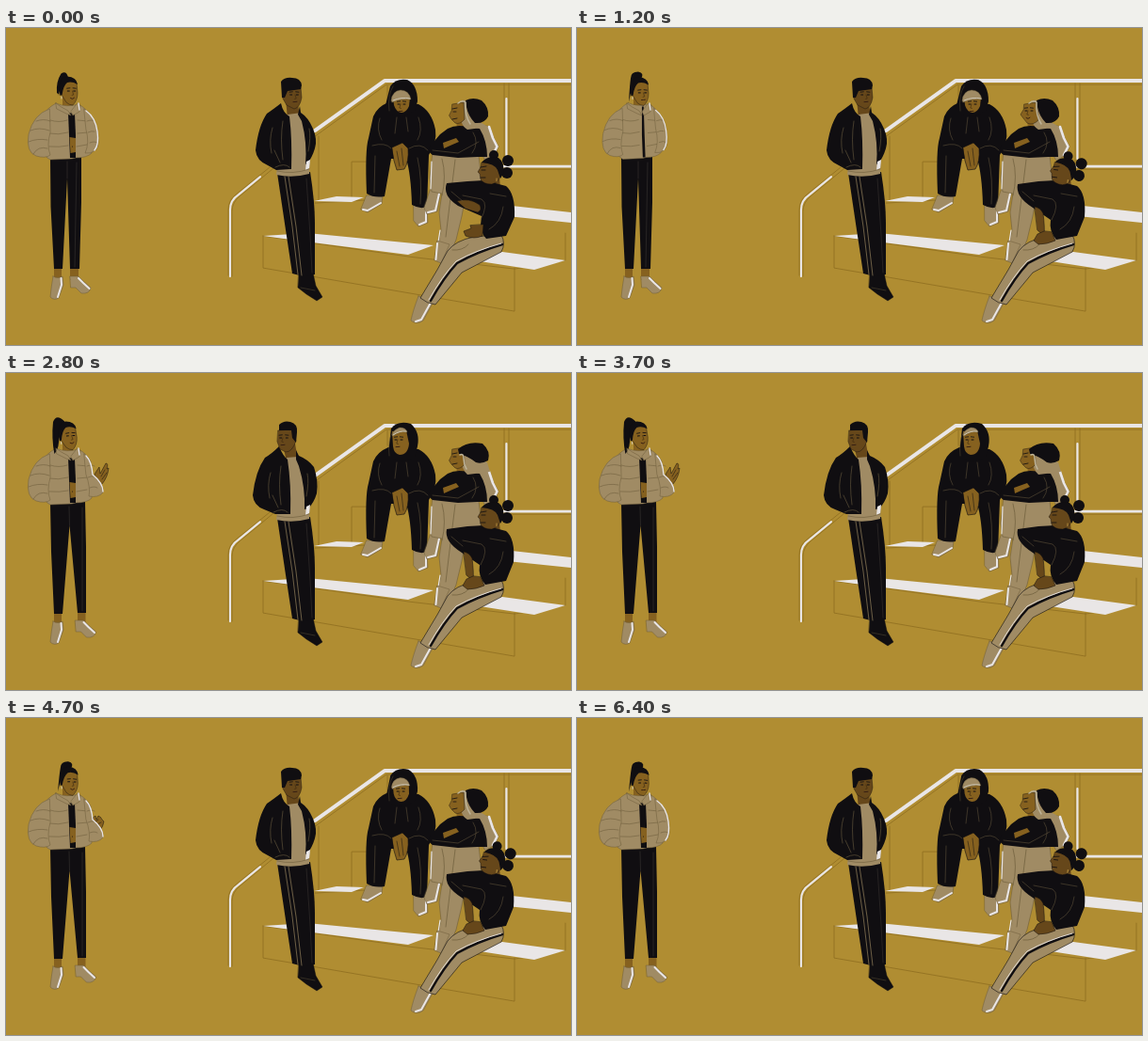
Animation of 600x337 px, one loop 6.5 s. Source, as an HTML page with a canvas:

```html
<!DOCTYPE html>
<html lang="en">
<head>
<meta charset="utf-8">
<title>Friends on the steps</title>
<style>
html, body { margin: 0; width: 100%; height: 100%; overflow: hidden; background: #b08d32; }
canvas { display: block; width: 100vw; height: 100vh; }
</style>
</head>
<body>
<canvas id="stage"></canvas>
<script>
const W = 600, H = 337, LOOP = 6500, STEP = 100;
const GOLD = '#b08d32', INK = '#100e11', CLOTH = '#a08b64', WHITE = '#e9e6e6';
const TAN = '#86611f', BROWN = '#66471a', EDGE = '#8f6e20', SEAM = '#6a5d40', FOLD = '#6d5d3b';

const canvas = document.getElementById('stage');
const ctx = canvas.getContext('2d');
const ratio = Math.max(1, window.devicePixelRatio || 1);
canvas.width = Math.round(W * ratio);
canvas.height = Math.round(H * ratio);
ctx.lineCap = ctx.lineJoin = 'round';

const NUM = /-?\d+(\.\d+)?/g;

// Blend two paths that share the same commands.
function mix(a, b, k) {
  const ends = b.match(NUM);
  let i = 0;
  return a.replace(NUM, v => (+v + (ends[i++] - v) * k).toFixed(2));
}

function fill(path, color) {
  ctx.fillStyle = color;
  ctx.fill(new Path2D(path));
}

function line(path, color, width = 0.7) {
  ctx.strokeStyle = color;
  ctx.lineWidth = width;
  ctx.stroke(new Path2D(path));
}

function shape(path, color, edge = INK, width = 0.7) {
  fill(path, color);
  line(path, edge, width);
}

function shoe(path, shine) {
  shape(path, CLOTH, FOLD, 0.5);
  line(shine, WHITE, 2);
}

function dot(x, y, r, color) {
  ctx.fillStyle = color;
  ctx.beginPath();
  ctx.arc(x, y, r, 0, 7);
  ctx.fill();
}

function group(draw, dx = 0, dy = 0, angle = 0, px = 0, py = 0, sx = 1) {
  ctx.save();
  ctx.translate(px + dx, py + dy);
  ctx.rotate(angle);
  ctx.scale(sx, 1);
  ctx.translate(-px, -py);
  draw();
  ctx.restore();
}

// Eased value between [time, value] stops.
function key(t, ...stops) {
  let [t0, v0] = stops[0];
  if (t <= t0) return v0;
  for (const [t1, v1] of stops) {
    if (t < t1) {
      const k = (t - t0) / (t1 - t0);
      return v0 + (v1 - v0) * k * k * (3 - 2 * k);
    }
    [t0, v0] = [t1, v1];
  }
  return v0;
}

// Brows, eyes, nose and mouth; side points the nose left (-1) or right (1).
function features(x, y, side, gap = 4, smile = 0) {
  group(() => {
    line(`M${-gap - 1.6} -2.8 L${-gap + 1.6} -3.2 M${gap - 1.6} -3.2 L${gap + 1.6} -2.8`, INK, 0.8);
    line(`M${-gap - 1} 0 h2 M${gap - 1} 0 h2`, INK, 1);
    line(`M${side} 0 L${side * 2.2} 4 L${side * 0.6} 4.4`, '#3d290f', 0.6);
    line(`M${side - 2} 7.6 Q${side} ${7.6 + smile * 2} ${side + 2} 7.3`, '#321b12', 0.9);
  }, x, y);
}

function scenery() {
  line('M367 181 V143 H386 M332 116 V184 M405 62 V78 M328 187 L381 184 M273 222 V256 L540 302 V256 M273 222 L428 244 L540 257 L594 248 V219 M529 60 V146 M534 60 V146 M528 151 H600', EDGE, 0.8);
  fill('M327 185 L351 180 L380 181 L367 186Z', WHITE);
  fill('M537 190 L600 197 V208 L532 201Z', WHITE);
  fill('M273 222 L320 219 L454 232 L427 242 L310 227Z', WHITE);
  fill('M490 247 L527 239 L594 248 L561 258Z', WHITE);
  line('M600 61 H404 L331 114 L284 150 L249 179 Q240 186 240 196 V265', EDGE, 0.8);
  line('M280 149 L244 178 Q236 184 236 194 V264', EDGE, 0.8);
  line('M600 57 H402 L328 110', WHITE, 4);
  line('M531.4 76 V140', WHITE, 2.2);
  line('M527 148 H600', WHITE, 2.8);
  line('M270 159 L247 178 Q238 184 238 194 V265', WHITE, 2.1);
}

function puffer(t, shy, lift) {
  shape('M53 80 Q64 85 77 81 Q86 86 90 94 L91 133 Q86 138 74 138 L70 139 L47 140 Q42 138 41 133 L37 96 Q42 86 53 80Z', CLOTH, FOLD, 0.5);
  line('M47 98 Q56 101 65 98 M45 112 Q56 114 66 111 M46 126 Q57 127 66 125 M76 98 L87 99 M76 112 L87 111 M75 126 L86 124', FOLD, 0.55);
  fill(mix('M66 90 L73 91 L74 114 L74 138 L68 138 L67 114Z', 'M69 84 L71 84 L72 114 L73 138 L70 138 L69 114Z', shy), INK);
  if (shy < 0.8) {
    fill(mix('M67.5 116 L74 117 L74 132 L68.5 133Z', 'M70 118 L71 118 L71 134 L70 134Z', shy), TAN);
    dot(70.5, 126, 0.5, INK);
  }
  shape('M46 86 Q29 92 24 113 Q21 132 32 136 Q42 139 47 135 Q43 125 47 111Z', CLOTH, FOLD, 0.5);
  line('M32 99 Q40 96 47 99 M26 109 Q35 105 46 109 M24 121 Q33 117 44 119 M29 134 Q34 125 44 128', FOLD, 0.55);

  if (lift > 0.1) {
    const curl = key(t, [4200, 0], [4500, 1]);
    group(() => {
      shape(mix('M95 121 Q92 111 95 106 L99 100 L100 107 L106 96 Q109 96 107 102 L109 101 Q108 111 102 118Z',
        'M92 119 Q90 112 92 106 L95 104 L96 108 L98 104 Q101 105 102 108 L104 110 Q103 116 100 119Z', curl), TAN, INK, 0.5);
      line(mix('M101 110 L105 103 M102 113 L107 106', 'M95 110 L98 108 M97 113 L101 111', curl), INK, 0.5);
    }, -9 * (1 - lift), 20 * (1 - lift));
  }
  const sleeve = mix('M83 86 Q94 93 97 108 Q100 125 95 130 Q90 134 84 133 Q89 122 85 108Z',
    'M83 86 Q91 93 92 108 Q104 117 103 127 Q98 133 88 131 Q90 122 85 108Z', lift);
  shape(sleeve, CLOTH, FOLD, 0.5);
  line('M86 99 Q91 97 94 99 M87 111 Q91 109 94 110 M89 122 Q94 120 97 122', FOLD, 0.55);
  line(mix('M85 88 Q95 95 97 110 Q99 124 94 130', 'M85 88 Q91 94 92 108 Q103 117 103 126', lift), WHITE, 1.4);
}

function presenter(t) {
  const shy = key(t, [500, 0], [1000, 1], [1400, 1], [1800, 0]);
  const stance = key(t, [1350, 0], [1750, 1]);
  const lift = key(t, [1450, 0], [1900, 1], [5100, 1], [5600, 0]);
  const bun = key(t, [0, 0.5], [500, 0.5], [1000, 1], [1450, 1], [1850, 0], [4100, 0], [4500, 1]);
  const nod = key(t, [500, 0], [1000, 1], [1450, 1], [1850, 0], [4100, 0], [4500, 0.4], [5400, 0.4], [6000, 1]);
  const tilt = key(t, [2100, 0], [2500, -0.07], [4100, -0.07], [4500, 0.03]);

  fill('M51 254 H59 V267 H51Z', TAN);
  fill(mix('M68 254 H77 V268 H68Z', 'M76 254 H84.5 V267 H76Z', stance), TAN);
  fill(mix('M47 138 L80 137 L80 185 L78 256 L68 256 L65 160 L60 256 L51 256 L47.5 190Z',
    'M47 138 L84 137 L85 185 L85 255 L76 255 L67.5 162 L60 256 L51 256 L48 190Z', stance), INK);
  line(mix('M65 142 L65 160 M75 143 L73 254', 'M67 142 L67.5 162 M81 143 L81 253', stance), '#403d39', 0.5);
  shoe('M50 264 Q55 267 60 264 L61 273 L56 287 Q51 290 47 286 Q48 275 50 264Z', 'M58.5 266 L59 273 L55 286');
  group(() => shoe('M68 264 L77 264 L83 270 L90 276 Q89 283 80 282 L74 276 L69 276Z', 'M77 266 L82 271 L88.5 277'), stance * 5.5, stance * -1);

  fill('M60 69 L71 76 L71 87 Q65 90 60 84Z', TAN);
  group(() => puffer(t, shy, lift), shy * 0.5, shy * -0.5, 0, 62, 0, 1 - shy * 0.08);
  group(() => {
    fill(mix('M64 51 Q56 42 52 51 Q49 68 51 85 Q57 80 57 66 Q57 58 64 53Z',
      'M68 54 Q72 47 65 46 Q57 46 57 53 Q56 60 55 78 Q57 69 59 60Z', bun), INK);
    shape('M59 60 Q66 53 75 58 L76 69 Q76 77 71 82 Q67 82 64 79 L59 71Z', TAN, INK, 0.4);
    fill('M57.5 72 Q54 53 65 51.5 Q75 52 76 60 Q70 56.5 65 58 Q61 61 59.5 71Z', INK);
    features(69.5, 67 + nod * 1.4, 1, 3.2, nod < 0.5 ? 1 : 0);
    line('M59 73 V75', WHITE, 0.7);
  }, 0, nod * 0.5, tilt, 65, 80);
  shape('M53 80 Q58 84 66 88 L69 93 L64 91 L54 86Z', CLOTH, FOLD, 0.5);
  shape('M76 80 L79 82 L78 89 L71 93 L69 89Z', CLOTH, FOLD, 0.5);
  line('M77 80 L78 87', WHITE, 1.4);
}

function standing(k) {
  shape('M311 261 L326 260 L329 274 L336 286 L330 290 L319 283 L310 276Z', INK, INK, 0.4);
  line('M313 276 L328 279', SEAM, 0.4);
  fill('M288 154 L323 153 Q328 185 328 207 L328 262 Q316 265 304 261 L296 208Z', INK);
  line('M296 158 L304 211 L310 262 M300 158 L308 211 L314 263', CLOTH, 0.65);
  line('M319 160 L323 220 L325 260', '#3e3935', 0.5);

  fill(mix('M297 76 L310 81 L312 93 L299 96Z', 'M294 77 L307 75 L310 93 L298 94Z', k), BROWN);
  fill(mix('M299 92 L314 90 L319 114 L323 140 L322 155 Q304 160 287 156 L288 148 L301 149 L302 116Z',
    'M298 90 L310 89 L317 112 L323 140 L322 155 Q304 160 287 156 L288 148 L301 149 L301 116Z', k), CLOTH);
  fill(mix('M292 80 Q283 87 277 91 Q268 104 265 130 Q266 141 278 146 L287 151 L303 150 Q304 118 301 94 Q294 90 292 80Z',
    'M290 78 Q282 86 275 90 Q265 104 262 130 Q263 141 274 145 L286 150 L302 150 Q303 118 299 92 Q294 88 290 78Z', k), INK);
  fill(mix('M312 83 L313 90 Q321 95 326 107 Q331 119 328 128 Q325 138 320 144 L318 145 Q320 122 314 99 L310 92Z',
    'M308 82 L311 88 Q321 92 327 100 Q332 115 330 128 Q327 138 321 144 L317 145 Q318 122 311 99 L308 92Z', k), INK);
  fill('M319 142 L323 140 L322 149 L318 151Z', WHITE);
  line('M288 152 Q305 156 322 150', FOLD, 0.6);
  group(() => line('M294 99 Q291 118 294 140 M283 106 Q279 119 282 133 M286 148 Q296 143 301 148 M322 107 Q324 116 321 131 M285 130 L291 143', SEAM, 0.6), -2 * k, 0);

  shape(mix('M294 66 L313 63 L314 74 Q312 85 306 86 L298 82 L294 75Z',
    'M289 61 L304 60 L308 72 Q304 84 297 84 L291 81 L288 73Z', k), BROWN, INK, 0.4);
  fill(mix('M293 74 L292 57 Q296 52 304 53 Q313 53 314 61 L313 65 L299 67 L296 74Z',
    'M290 61 L290 55 Q295 50 302 52 Q310 54 309 63 L308 74 L304 69 L303 61Z', k), INK);
  features(306 - 11 * k, 71 - 2 * k, k < 0.5 ? 1 : -1, 3.3);
}

function hooded(k) {
  shoe('M383 178 L400 178 L399 187 L384 196 L377 193Z', 'M379 193 L384 194 L398 186');
  shoe('M433 188 L447 189 L448 207 L438 211 L433 205Z', 'M446 191 L446 206 L439 209');
  fill('M406 79 Q394 84 390 94 L385 117 Q381 130 383 176 Q391 181 402 179 L409 139 L425 139 Q430 155 431 188 Q440 193 447 190 L449 135 Q458 122 456 108 Q452 88 438 81Z', INK);
  line('M397 96 Q393 108 399 119 M438 95 Q443 109 437 119 M415 95 L413 112 M425 95 L427 110 M389 125 Q403 121 409 128 M428 128 Q440 121 448 130 M437 138 Q442 160 440 187 M392 136 L391 175', SEAM, 0.5);
  shape('M410 127 L421 122 L427 128 Q428 142 423 150 L415 151 L412 141Z', TAN, INK, 0.6);
  line('M415 131 L418 147 M420 128 L422 146', INK, 0.5);
  fill(mix('M402 86 Q405 74 408 62 Q414 53 426 55 Q437 60 437 78 L434 88 Q422 97 408 92Z',
    'M406 87 Q407 74 409 59 Q416 50 430 54 Q440 63 437 78 L434 89 Q424 97 411 91Z', k), INK);
  fill(mix('M411 74 L429 74 L428 83 Q425 90 420 90 Q414 89 412 82Z',
    'M410 62 L425 61 L428 75 Q427 87 418 87 Q412 86 411 78Z', k), TAN);
  shape(mix('M409 77 Q410 67 419 66 Q428 66 430 76 Q420 75 410 79Z',
    'M410 65 Q412 60 418 58 Q425 58 426 63 Q418 61 411 67Z', k), CLOTH, FOLD, 0.4);
  line(mix('M411 77 Q420 73 429 75', 'M411 66 Q418 61 425 62', k), '#cbc4b2', 1);
  features(420 - 3 * k, 81 - 10 * k, -1, 3);
  line('M407 88 Q405 71 411 62', SEAM, 0.4);
}

function wrapped(turn, listen) {
  shoe('M451 171 L462 173 L458 195 L447 198 L444 191Z', 'M460 176 L456 194 L448 196');
  shape('M485 98 L514 105 L518 117 L523 126 L519 135 L509 141 L497 120Z', CLOTH, FOLD, 0.5);
  line('M513 105 L517 117 L521.5 126 L517 135', WHITE, 2.6);
  shape('M453 134 L502 136 L505 162 L490 168 L484 200 L478 225 L469 247 L456 244 L462 215 L460 196 L463 176 L452 174 L450 160Z', CLOTH, FOLD, 0.6);
  line('M463 139 Q468 158 463 178 M477 140 Q472 180 467 222', FOLD, 0.7);
  line('M452 142 L451 171 M461 215 L457 240', WHITE, 1.2);
  shoe('M458 226 L471 230 L462 250 L455 247Z', 'M458 229 L456.5 246');

  fill('M478 96 L491 96 L494 108 L479 108Z', TAN);
  fill('M469 107 Q478 102 490 105 L503 107 Q511 120 511 137 L501 137 L480 138 L453 135 Q447 131 450 126 L461 113Z', INK);
  fill('M464 122 L478 117 L481 121 L474 124 L465 128Z', TAN);
  line('M453 130 L480 133 L502 121 M496 111 Q503 122 495 133', SEAM, 0.5);

  fill(mix('M484 77 Q488 75 491 80 L500 98 L512 105 L490 108 Q481 103 484 88Z',
    'M482 84 Q488 82 494 86 L511 95 L514 105 L490 108 Q484 103 483 90Z', listen), CLOTH);
  shape(mix('M474 81 L486 79 L487 97 Q482 103 477 101 L473 97 L470.5 93 L473 88Z',
    'M475 81 L488 79 L490 98 Q484 104 478 101 L474 96 L471 92 L474 87Z', turn), TAN, INK, 0.4);
  fill(mix('M488 77 Q496 73 505 77 Q513 84 512 94 Q508 102 498 101 Q491 94 489 84Z',
    'M480 81 Q490 72 506 75 Q515 83 512 93 Q505 97 499 95 Q490 88 481 86Z', listen), INK);
  line(mix('M480 80 Q485 76 488 79 Q487 93 493 102', 'M482 87 Q486 85 486 91 Q486 97 489 102', listen), '#bdb398', 1.5);
  if (turn > 0.5) features(480, 88, -1, 3, 1);
  else line('M474 86 L479 85 M475 89 H478 M474 97 L479 96', INK, 0.8);
}

function seated(up, arm) {
  shoe('M438 285 L454 291 L443 311 Q436 316 430 311 Q432 301 438 285Z', 'M451 292 L441 310 L435 312');
  shape('M526 220 Q531 229 526 238 L484 260 L456 294 Q447 293 440 287 L458 257 L469 237 Q477 226 497 222Z', CLOTH, INK, 0.6);
  line('M527 230 Q500 238 479 250 Q465 265 451 290', INK, 2.4);
  line('M526 229 Q500 236 478 248 Q463 264 449 289', WHITE, 0.9);
  line('M474 236 Q485 237 491 230', FOLD, 0.7);

  fill('M506 158 L524 158 L525 171 L509 170Z', BROWN);
  fill(mix('M508 162 L531 168 Q541 176 540 201 L531 221 L510 224 Q502 216 505 200 L480 189 Q463 178 468 165 L490 163Z',
    'M508 162 L531 168 Q541 176 539 201 L531 221 L509 225 Q501 216 503 204 L484 191 Q465 179 468 166 L490 163Z', arm), INK);
  shape(mix('M479 184 Q492 180 503 188 Q506 193 501 196 L488 192Z',
    'M486 190 Q492 191 495 197 Q497 213 496 221 L489 215Z', arm), BROWN, INK, 0.5);
  shape(mix('M507 209 L506 221 Q497 225 488 221 L486 216 L494 213 L493 210Z',
    'M504 217 L508 226 Q499 230 490 230 L485 226 L489 219 L496 216Z', arm), BROWN, INK, 0.5);
  line('M485 178 L505 182 Q513 187 504 204 M514 176 L531 179 M528 190 Q526 207 513 214 M473 174 L485 184', SEAM, 0.5);

  group(() => {
    dot(518, 135, 5, INK);
    dot(533, 141, 6, INK);
    dot(532, 154, 6, INK);
    shape('M505 143 L520 139 L526 153 Q525 164 516 166 Q507 166 504 161 L503 155 L501 153 L504 148Z', BROWN, INK, 0.4);
    fill('M505 143 Q511 135 523 138 Q530 143 528 155 L525 160 L522 151 Q519 144 505 143Z', INK);
    line('M504 148 L510 147 M505 151 H509 M504 159 L509 159', INK, 0.8);
    line('M521 160 V163', '#c9a047', 0.8);
  }, up, up, up * 0.13, 517, 155);
}

function render(t) {
  ctx.setTransform(ratio, 0, 0, ratio, 0, 0);
  fill('M0 0 H600 V337 H0Z', GOLD);
  const listen = key(t, [2250, 0], [2650, 1], [4050, 1], [4450, 0]);
  const hood = key(t, [2250, 0], [2650, 1], [4050, 1], [4450, 0.3]);
  const turn = key(t, [600, 0], [1000, 1], [2200, 1], [2500, 0]);
  const up = key(t, [500, 0], [900, 1], [2250, 1], [2650, 0], [4050, 0], [4450, 1]);
  group(scenery, 0, -0.9);
  hooded(hood);
  wrapped(turn, listen);
  seated(up, key(t, [400, 0], [900, 1]));
  standing(listen);
  presenter(t);
}

function tick(now) {
  render(Math.floor(now % LOOP / STEP) * STEP);
  requestAnimationFrame(tick);
}
tick(performance.now());
</script>
</body>
</html>
```
